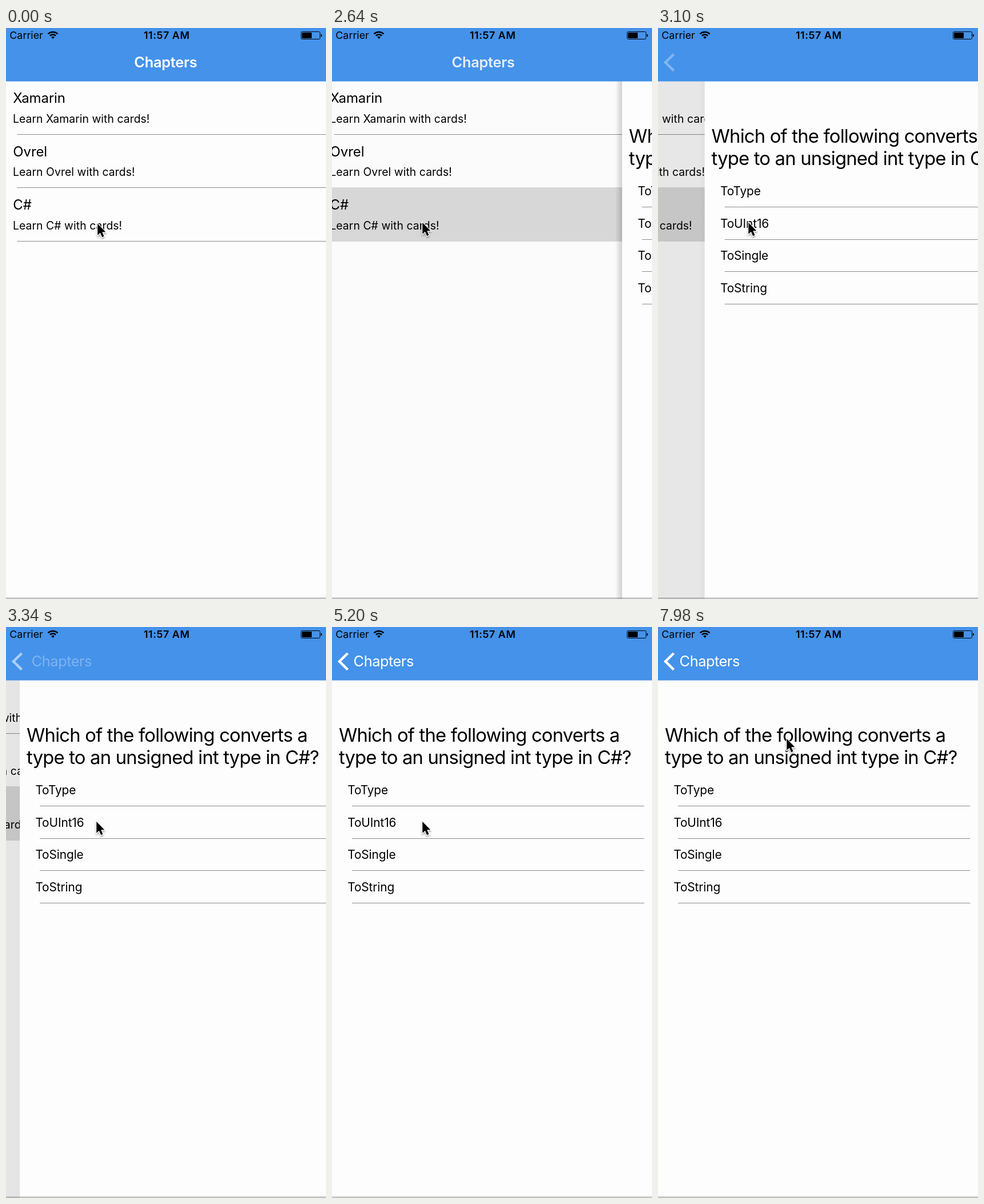
These frames come from a looping animation (560 px wide and 1000 px high, 8000 ms). An HTML page:

```html
<!DOCTYPE html>
<html lang="en">
<head>
<meta charset="utf-8">
<title>Chapter cards</title>
<style>
  html, body { margin: 0; width: 100%; height: 100%; overflow: hidden; background: #fdfdfd; }
  svg { display: block; width: 560px; height: 1000px; }
  text { font-family: Inter, Roboto, sans-serif; font-optical-sizing: none; white-space: pre; }
  .status { font-size: 17.9px; }
  .time { font-weight: 600; letter-spacing: .55px; text-anchor: middle; }
  .nav { font-size: 25.4px; letter-spacing: -.5px; fill: #fff; }
  .title { font-weight: 600; letter-spacing: -.3px; }
  .name { font-size: 24px; letter-spacing: -.1px; }
  .detail { font-size: 19.4px; letter-spacing: .04px; }
  .question { font-size: 32.85px; letter-spacing: -.83px; }
  .option { font-size: 20.9px; letter-spacing: -.12px; }
  .rule { stroke: #8c8c8c; stroke-width: 1; }
</style>
</head>
<body>
<svg viewBox="0 0 560 1000">
  <defs>
    <linearGradient id="shade">
      <stop offset="0" stop-opacity="0"/>
      <stop offset="1" stop-opacity=".2"/>
    </linearGradient>
    <filter id="soft" x="-50%" y="-50%" width="200%" height="200%">
      <feDropShadow dx="0" dy="2" stdDeviation="1.5" flood-opacity=".4"/>
    </filter>
  </defs>

  <rect width="560" height="1000" fill="#fdfdfd"/>
  <g id="chapters">
    <g id="list">
      <g id="rules"/>
      <rect id="selected" y="279" width="750" height="95" fill="#d9d9d9"/>
    </g>
    <rect id="dim" y="93" width="560" height="907"/>
  </g>

  <g id="card">
    <rect id="shadow" x="-12" y="93" width="12" height="907" fill="url(#shade)"/>
    <rect y="93" width="560" height="907" fill="#fdfdfd"/>
    <text class="question" x="11.9" y="200.5">Which of the following converts a</text>
    <text class="question" x="11.9" y="240">type to an unsigned int type in C#?</text>
  </g>

  <rect y="998" width="560" height="1" fill="#777"/>
  <rect width="560" height="93.5" fill="#4492ea"/>
  <text id="title" class="nav title" x="224.3" y="69.3">Chapters</text>
  <path id="chevron" d="M27.5 46 13 60.3 27.5 74.6" fill="none" stroke="#fff" stroke-width="4.4"/>
  <text id="back" class="nav" x="37.6" y="69.3">Chapters</text>

  <text class="status" x="6.3" y="19">Carrier</text>
  <g fill="none" stroke="#000" stroke-width="2.5">
    <path d="M73.5 10.4a12.2 12.2 0 0 1 17 0M76.8 13.7a7.4 7.4 0 0 1 10.4 0"/>
    <path d="M82 19l-2.9-2.9a4.1 4.1 0 0 1 5.8 0z" fill="#000" stroke="none"/>
  </g>
  <text class="status time" x="281.2" y="19">11:57 AM</text>
  <rect x="516.5" y="6.5" width="33" height="13" rx="2" fill="none" stroke="#000"/>
  <rect x="518" y="8" width="17" height="10" rx="1"/>
  <path d="M551 10.5q2 .5 2 2.5t-2 2.5z"/>

  <g id="cursor">
    <path d="M0 0V20L4.6 15.9 7.9 23.4 11.2 21.9 8 14.5H14Z" stroke="#fff"
      stroke-width="2.2" paint-order="stroke" filter="url(#soft)"/>
  </g>
</svg>
<script>
const $ = id => document.getElementById(id);
const clamp = v => Math.min(1, Math.max(0, v));
const ramp = (t, from, to) => clamp((t - from) / (to - from));
const ease = v => v * v * (3 - 2 * v);

function add(parent, tag, attrs, content = '') {
  const node = document.createElementNS('http://www.w3.org/2000/svg', tag);
  for (const key in attrs) node.setAttribute(key, attrs[key]);
  node.textContent = content;
  $(parent).append(node);
}

function rule(parent, x1, x2, top) {
  const y = Math.floor(top) + .5;
  add(parent, 'line', { class: 'rule', x1, x2, y1: y, y2: y });
}

['Xamarin', 'Ovrel', 'C#'].forEach((name, i) => {
  const y = i * 93.4;
  add('list', 'text', { class: 'name', x: 12.3, y: 131.3 + y }, name);
  add('list', 'text', { class: 'detail', x: 12, y: 165.8 + y }, `Learn ${name} with cards!`);
  rule('rules', 19.5, 750, 186.3 + y);
});

['ToType', 'ToUInt16', 'ToSingle', 'ToString'].forEach((name, i) => {
  const y = i * 56.5;
  add('card', 'text', { class: 'option', x: 27.2, y: 293.4 + y }, name);
  rule('card', 35, 546.5, 313.5 + y);
});

const LOOP = 8000, TAP = 2500, PUSH = 2560, RATE = .0063;
const move = (id, x, y = 0) => $(id).setAttribute('transform', `translate(${x} ${y})`);
const fade = (id, alpha) => $(id).setAttribute('opacity', alpha);

function draw(t) {
  // Critically damped spring for the page push
  const u = Math.max(0, t - PUSH) * RATE;
  const left = (1 + u) * Math.exp(-u);
  const p = 1 - left;

  move('list', -168 * p);
  move('card', 560 * left);
  fade('card', u > 0 ? 1 : 0);
  fade('shadow', left);
  fade('dim', .1 * p);
  fade('selected', t >= TAP ? 1 : 0);
  // The old page goes away once it is all but covered
  fade('chapters', left > .005 ? 1 : 0);

  move('title', -158 * p);
  fade('title', clamp(1 - 1.6 * p));
  move('back', 167 * left);
  fade('back', ramp(t, 3160, 3760));
  fade('chevron', ramp(t, 2770, 3780));

  const settle = ease(ramp(t, 20, 400));
  const leave = ease(ramp(t, 7300, 7980));
  move('cursor', 160.3 - 2 * settle + 67 * leave, 342.8 - 2 * settle - 145 * leave);
}

const start = performance.now();
function tick() {
  draw((performance.now() - start) % LOOP);
  requestAnimationFrame(tick);
}
tick();
</script>
</body>
</html>
```
